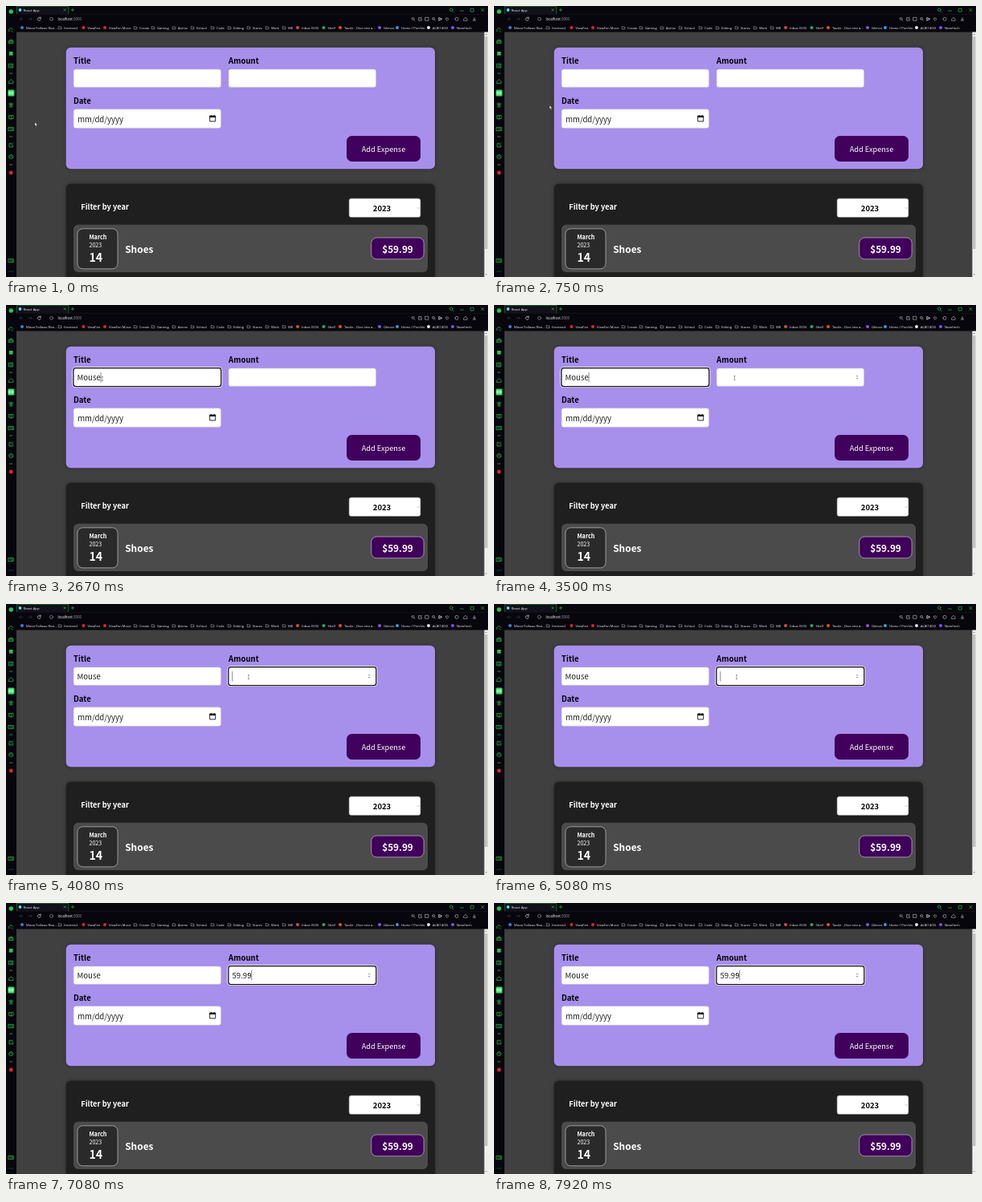
An HTML page that plays this animation: 600x338 px, repeating every 8 s.

```html
<!DOCTYPE html>
<html lang="en">
<head>
<meta charset="utf-8">
<title>Expense form</title>
<style>
  html, body { margin: 0; width: 100%; height: 100%; overflow: hidden; background: #404040; }
  svg { display: block; width: 100%; height: 100%; }
  text { font-family: "Noto Sans CJK JP", "Noto Sans CJK SC", "Noto Sans CJK", "Noto Sans", sans-serif; white-space: pre; }
  .bold { font-weight: 700; }
  .field { font-size: 9.6px; fill: #222; }
  .label { font-size: 9.6px; font-weight: 700; }
  .chrome text { font-family: "Open Sans", "Noto Sans", sans-serif; font-size: 4.1px; font-weight: 500; fill: #f0eff5; }
  .card { filter: drop-shadow(0 .6px 2px rgba(0, 0, 0, .35)); }
  .icons { fill: none; stroke-width: .65; stroke-linecap: round; stroke-linejoin: round; }
</style>
</head>
<body>
<svg viewBox="0 0 600 338">
  <rect width="600" height="338" fill="#404040"/>

  <g class="chrome">
    <path d="M0 0H600V32.5H13V338H0Z" fill="#08060d"/>
    <path d="M13 0H78V10H13Z" fill="#121019"/>
    <path d="M13 10.3H600" stroke="#1c1925" stroke-width=".5"/>
    <path d="M13.3 10V.4H77.8V10" fill="none" stroke="#169a3a" stroke-width=".6"/>
    <circle cx="17.5" cy="5" r="1.9" fill="#5fd3ec"/>
    <text x="21.5" y="6.7" style="font-size:4.3px">React App</text>
    <text x="64.4" y="17.9" style="font-size:4.4px;fill:#fff">localhost<tspan fill="#a19eaa">:3000</tspan></text>
    <g class="icons" stroke="#22c950">
      <path d="M72 3.7l2.4 2.4m0-2.4L72 6.1M81.2 4.9h3.6m-1.8-1.8v3.6"/>
      <path d="M555.7 6.4l1.5 1.5M565.5 6h4M578.6 3.4h3.6v3.6h-3.6zM591.6 3.4l3.4 3.4m0-3.4l-3.4 3.4"/>
      <circle cx="554.2" cy="4.7" r="1.8"/>
    </g>
    <g class="icons" stroke="#9b98a4">
      <path d="M21 16.3h-4m1.6-1.7L17 16.3l1.6 1.7M28 16.3h4m-1.6-1.7l1.6 1.7-1.6 1.7" stroke="#3d3a45"/>
      <path d="M43 15.1a2 2 0 1 0 .3 1.8M43.2 13.8v1.5h-1.5" stroke="#d6d4dc"/>
      <circle cx="56.5" cy="16.3" r="2"/>
    </g>
    <g id="toolbar" class="icons" stroke="#c4c2cc"></g>
    <g id="bookmarks"></g>
    <g id="sidebar" class="icons" stroke="#1fc84d"></g>
  </g>

  <rect x="595.4" y="32.5" width="4.6" height="305.5" fill="#efefef"/>
  <path d="M596.7 36l1.1-1.3 1.1 1.3z" fill="#666"/>
  <path d="M596.7 334.5l1.1 1.3 1.1-1.3z" fill="#666"/>
  <rect x="596" y="38" width="3.5" height="265" fill="#c2c2c2"/>

  <rect class="card" x="74.7" y="51.8" width="459.3" height="151.4" rx="6" fill="#a78fec"/>
  <text class="label" x="84" y="71.7">Title</text>
  <text class="label" x="277" y="71.7">Amount</text>
  <text class="label" x="84" y="121.7">Date</text>
  <g fill="#fff" stroke="#ccc" stroke-width=".5">
    <rect x="84.2" y="79" width="183.3" height="22.3" rx="2.6"/>
    <rect x="277.2" y="79" width="183.3" height="22.3" rx="2.6"/>
    <rect x="84.2" y="128.8" width="183.3" height="23.4" rx="2.6"/>
  </g>
  <g id="focus" fill="none">
    <rect x="83.6" y="78.4" width="184.5" height="23.5" rx="3" stroke="#fff" stroke-width="2.4"/>
    <rect x="83.9" y="78.7" width="183.9" height="22.9" rx="2.8" stroke="#101010" stroke-width="1.3"/>
  </g>
  <text id="title" class="field" x="88.5" y="94.2"></text>
  <text id="amount" class="field" x="281.5" y="94.2"></text>
  <path id="caret" d="M0 84V96.5" stroke="#333" stroke-width=".6"/>
  <path id="spinner" d="M450.5 89.3l1.6-1.7 1.6 1.7zM450.5 91.1l1.6 1.7 1.6-1.7z" fill="#999"/>
  <text class="field" x="89.2" y="144.7">mm/dd/yyyy</text>
  <path d="M253.7 137.3h7v6.6h-7z" fill="none" stroke="#111" stroke-width=".9"/>
  <path d="M253.3 136.8h7.8v2.2h-7.8zM254.8 136h1v1h-1zM258.6 136h1v1h-1z" fill="#111"/>
  <rect x="424" y="162" width="92" height="32" rx="6.5" fill="#40005b"/>
  <text x="470" y="181.8" text-anchor="middle" font-size="9.2" font-weight="500" fill="#fff">Add Expense</text>

  <rect class="card" x="74.7" y="221.8" width="459.3" height="130" rx="6" fill="#1f1f1f"/>
  <rect x="427.2" y="240.2" width="88.6" height="23.1" rx="2.6" fill="#fff" stroke="#ccc" stroke-width=".5"/>
  <text class="bold" x="468" y="255.8" text-anchor="middle" font-size="9.5">2023</text>
  <path d="M512.2 251.5l1 1 1-1" fill="none" stroke="#555" stroke-width=".5"/>
  <rect x="84" y="272.8" width="441" height="59.2" rx="6" fill="#4b4b4b"/>
  <g stroke="#d8d8d8" stroke-width=".6">
    <rect x="89" y="277.8" width="50" height="50" rx="6.5" fill="#2a2a2a"/>
    <rect x="454.7" y="289" width="65.4" height="26.7" rx="6.5" fill="#40005b"/>
  </g>
  <g fill="#fff">
    <text class="bold" x="93.2" y="253.7" font-size="9.3">Filter by year</text>
    <text class="bold" x="103.4" y="290.8" font-size="7.3">March</text>
    <text x="103.4" y="300.6" font-size="7.2" font-weight="500">2023</text>
    <text class="bold" x="103.4" y="318.7" font-size="14.2">14</text>
    <text class="bold" x="148.2" y="308" font-size="11.9">Shoes</text>
    <text class="bold" x="487.5" y="307.9" text-anchor="middle" font-size="11.8">$59.99</text>
  </g>

  <path id="arrow" d="M0 0V4.4L1 3.5 1.8 5.2 2.5 4.9 1.8 3.2H3.1Z" fill="#fff" stroke="#111" stroke-width=".3"/>
  <path id="beam" d="M-1 -2.5H1M0 -2.5V2.5M-1 2.5H1" fill="none" stroke="#444" stroke-width=".5"/>
</svg>
<script>
const LOOP = 8000;
const $ = id => document.getElementById(id);

// Browser chrome
const folder = "#c9c6d2";
const bookmarks = [
  [20, "#3d7de0", "Moon Follows Rive..."], [67, folder, "frontend"], [96.5, "#e3242b", "ViewFen"],
  [123, "#e3242b", "ViewFen Music"], [161, folder, "Create"], [183, folder, "Gaming"],
  [209, folder, "Anime"], [232, folder, "School"], [257, folder, "Code"], [278, folder, "Editing"],
  [302, folder, "Stores"], [325, folder, "Work"], [346, folder, "MK"], [363, "#e04a3c", "Inbox (535)"],
  [395.5, "#2fa866", "Shelf"], [416, "#f2501e", "Tavvle - Dive into a..."], [465, "#8f50ee", "Glimvo"],
  [487, "#2f9ee8", "Home / Perchlo"], [526, "#e8e8e8", "ALB(1403)"], [556, "#7a52f4", "Notefinch"]
];
$("bookmarks").innerHTML = bookmarks.map(([x, color, name]) => (color === folder
  ? `<path d="M${x - 1.8} 25.6h1.4l.5.6h1.9v2.5h-3.8z" fill="none" stroke="${color}" stroke-width=".5"/>`
  : `<circle cx="${x}" cy="27.1" r="2" fill="${color}"/>`)
  + `<text x="${x + 5}" y="28.5">${name}</text>`).join("");

const glyphs = {
  ring: "M-2.3 0a2.3 2.3 0 1 0 4.6 0a2.3 2.3 0 1 0-4.6 0",
  clock: "M-2.3 0a2.3 2.3 0 1 0 4.6 0a2.3 2.3 0 1 0-4.6 0M0-1.3V0l1 .6",
  box: "M-2.2-2.2h4.4v4.4h-4.4z",
  gauge: "M-2.3 1.5A2.4 2.4 0 1 1 2.3-.6M0 .5l1.6 1.6",
  bag: "M-2.3-.6h4.6v3h-4.6zM-1.2-.6v-1.2h2.4v1.2M-2.3.9h4.6",
  list: "M-2.2-2.2h4.4v4.4h-4.4zM-1-.8h2M-1 .8h2",
  home: "M-2.4 0L0-2.3 2.4 0v2.2h-4.8z",
  book: "M0-1.5v3.7M0-1.5l-2.4-.5v3.7l2.4.5 2.4-.5V-2z",
  gift: "M-2.3-1.5h4.6M-1.8 0h3.6M-1.8 2h3.6M0-2.3V2.2",
  card: "M-2.7-1.9h5.4v3.8h-5.4zM-1.5-.3h1M.6-.5h1M.6.6h1",
  edit: "M.4-2h-2.5v4.2h4.2V0M-.4.4l2.8-2.8",
  dash: "M-1.5 0h3",
  dots: "M-2 0h.1M0 0h.1M2 0h.1",
  search: "M-2-.5a1.6 1.6 0 1 0 3.2 0a1.6 1.6 0 1 0-3.2 0M.8.7L2.2 2.1",
  plane: "M-2-1.8L2 0l-4 1.8z",
  heart: "M0 1.9L-2-.2C-2-2 0-2 0-.7 0-2 2-2 2-.2z",
  down: "M0-2v3M-1.2 0L0 1.2 1.2 0M-2 2h4"
};
const glyph = (name, x, y, scale) =>
  `<path d="${glyphs[name]}" transform="translate(${x} ${y}) scale(${scale})"/>`;

const sideIcons = [["gauge", 30], ["bag", 44], ["list", 74.5], ["dash", 84], ["home", 94],
  ["gift", 123.5], ["book", 138.5], ["card", 153.5], ["dash", 163], ["edit", 173.5],
  ["clock", 188], ["dash", 198], ["card", 317.5], ["dots", 331]];
$("sidebar").innerHTML = sideIcons.map(([name, y]) => glyph(name, 6.3, y, 1.1)).join("")
  + `<circle cx="6.3" cy="7" r="2.7" fill="#1fc84d" stroke="none"/>
     <rect x="4" y="57" width="4.6" height="4.6" fill="#1fc84d" stroke="none"/>
     <rect x="2.4" y="104.5" width="8" height="8" rx="1" fill="#2be05b" stroke="none"/>
     <path d="M4.2 107h4.4v3h-4.4zM4.2 108.5h4.4" stroke="#e9ffef"/>
     <circle cx="6.3" cy="208" r="2.4" fill="#e0242b" stroke="none"/>`;

const toolIcons = ["search", "edit", "box", "search", "plane", "plane", "heart", "ring", "home", "down"];
const toolX = [507, 515.5, 524, 532.5, 541, 541, 549, 561, 572, 583];
$("toolbar").innerHTML = toolIcons.map((name, i) => glyph(name, toolX[i], 16.3, .9)).join("");

// Interaction timeline, in ms
const pointerPath = [[0, 36, 145], [450, 36, 145], [1150, 120, 92], [2850, 120, 92], [3550, 302, 91], [LOOP, 302, 91]];
const fields = {
  title: { value: "Mouse", start: 88.5, focusAt: 1300, keys: [1720, 1930, 2110, 2290, 2460] },
  amount: { value: "59.99", start: 281.5, focusAt: 3700, keys: [5480, 5800, 6320, 6640, 6900] }
};

function pointerAt(t) {
  const i = pointerPath.findIndex((p, n) => n && t <= p[0]);
  const [t0, x0, y0] = pointerPath[i - 1], [t1, x1, y1] = pointerPath[i];
  const u = (t - t0) / (t1 - t0), k = u * u * (3 - 2 * u);
  return [x0 + (x1 - x0) * k, y0 + (y1 - y0) * k];
}

const show = (id, on) => $(id).setAttribute("visibility", on ? "visible" : "hidden");

function draw(t) {
  for (const [id, f] of Object.entries(fields))
    $(id).textContent = f.value.slice(0, f.keys.filter(k => k <= t).length);

  const active = t >= fields.amount.focusAt ? "amount" : t >= fields.title.focusAt ? "title" : null;
  show("focus", active);
  show("caret", false);
  if (active) {
    const f = fields[active], node = $(active);
    const lastInput = Math.max(f.focusAt, ...f.keys.filter(k => k <= t));
    const width = node.textContent ? node.getComputedTextLength() : 0;
    $("focus").setAttribute("transform", `translate(${active === "amount" ? 193 : 0} 0)`);
    $("caret").setAttribute("transform", `translate(${f.start + width + .3} 0)`);
    show("caret", (t - lastInput) % 1000 < 500);
  }

  const [x, y] = pointerAt(t);
  const inRow = y > 78.8 && y < 101.5;
  const overAmount = inRow && x > 277 && x < 460.7;
  const overInput = overAmount || x > 84 && x < 267.7 && (inRow || y > 128.6 && y < 152.4);
  show("spinner", overAmount || active === "amount");
  show("arrow", !overInput);
  show("beam", overInput);
  for (const id of ["arrow", "beam"]) $(id).setAttribute("transform", `translate(${x} ${y})`);
}

const begin = performance.now();
function tick() {
  draw((performance.now() - begin) % LOOP);
  requestAnimationFrame(tick);
}
tick();
</script>
</body>
</html>
```
